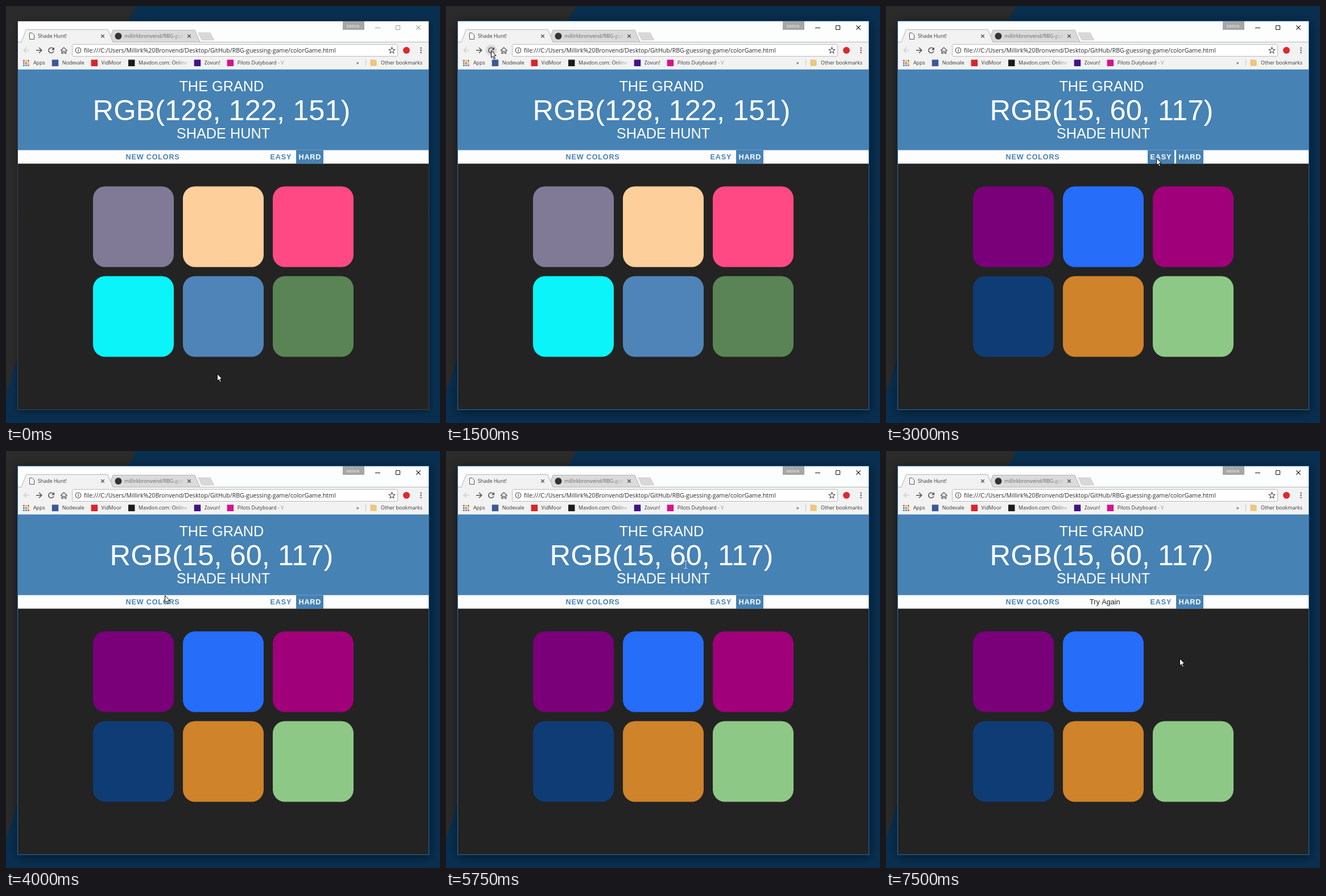
An HTML page with a canvas for the animation above (8 s loop, 763 by 734 pixels).

```html
<!DOCTYPE html>
<html lang="en">
<head>
<meta charset="utf-8">
<title>Shade Hunt</title>
<style>
html, body { margin: 0; width: 100%; height: 100%; overflow: hidden; background: #092f50; }
canvas { display: block; }
</style>
</head>
<body>
<canvas id="stage" width="763" height="734"></canvas>
<script>
const ctx = document.getElementById('stage').getContext('2d');
const LOOP = 8000, STEP = 250;
const UI = '"Open Sans", "Noto Sans", sans-serif';
const PAGE = '"Liberation Sans", Arial, sans-serif';
const EM = 12.65;
const STEEL = '#4682b4', DARK = '#232323', CHROME = '#f2f2f2';
const INK = '#333', ICON = '#505050', EDGE = '#b4b4b4';

const FIRST = ['#807a97', '#fdcf9b', '#ff4985', '#0af4fa', '#4f84b8', '#5a8456'];
const SECOND = ['#7a007a', '#266dfa', '#a0007a', '#0f3c75', '#cf832a', '#8ec886'];

const clamp = u => Math.max(0, Math.min(1, u));
const smooth = u => u * u * (3 - 2 * u);
const during = (t, from, to) => t >= from && t < to;

function rect(x, y, w, h, fill) {
  ctx.fillStyle = fill;
  ctx.fillRect(x, y, w, h);
}

function paint(path, fill, stroke, width = 1) {
  if (fill) { ctx.fillStyle = fill; ctx.fill(path); }
  if (stroke) { ctx.strokeStyle = stroke; ctx.lineWidth = width; ctx.stroke(path); }
}

const shape = (d, fill, stroke, width) => paint(new Path2D(d), fill, stroke, width);
const line = (d, color, width) => shape(d, null, color, width);

function circle(x, y, r, fill, stroke, width) {
  const path = new Path2D();
  path.arc(x, y, r, 0, Math.PI * 2);
  paint(path, fill, stroke, width);
}

function roundBox(x, y, w, h, r, fill, stroke) {
  const path = new Path2D();
  path.roundRect(x, y, w, h, r);
  paint(path, fill, stroke);
}

function text(str, x, y, font, color, align = 'left', spacing = 0) {
  ctx.font = font;
  ctx.textAlign = align;
  ctx.letterSpacing = spacing + 'px';
  ctx.fillStyle = color;
  ctx.fillText(str, x, y);
  const width = ctx.measureText(str).width;
  ctx.letterSpacing = '0px';
  return width;
}

// Small interface text that fades out before the given width
function label(str, x, y, room = 200, color = INK) {
  const fade = ctx.createLinearGradient(x + room - 24, 0, x + room, 0);
  fade.addColorStop(0, color);
  fade.addColorStop(1, color + '0');
  return Math.min(room, text(str, x, y, '8.9px ' + UI, fade));
}

function cross(x, y, r, color, width) {
  line(`M${x - r} ${y - r}l${2 * r} ${2 * r}m0 ${-2 * r}l${-2 * r} ${2 * r}`, color, width);
}

function desktop(focused) {
  rect(0, 0, 763, 734, '#092f50');
  shape('M0 0H229L217 22L21 618L0 684Z', '#2b2b2b');
  ctx.save();
  ctx.shadowColor = focused ? 'rgba(0,0,0,.55)' : 'rgba(0,0,0,.4)';
  ctx.shadowBlur = focused ? 18 : 12;
  ctx.shadowOffsetY = 3;
  rect(21, 26, 723, 685, DARK);
  ctx.restore();
}

function tabs() {
  rect(21, 27, 722, 37, '#fcfdfd');
  shape('M180 63.5L188 42.5H332L341 63.5Z', '#dadada', EDGE);
  shape('M338 47H359L366 60H344Z', '#d8d8d8', '#c6c6c6', .7);
  rect(21, 63, 722, 49, CHROME);
  line('M21 63.5H743', EDGE);
  shape('M27 64L35.5 41.5H179L188 64Z', CHROME);
  line('M27 63.5L35.5 41.5H179L188 63.5', EDGE);
  shape('M41.5 47.5H46L49.5 51V58.5H41.5Z', '#fff', ICON);
  label('Shade Hunt!', 56, 56);
  circle(197.5, 53, 6, INK);
  label('millirkbronvend/RBG-gue', 208, 56, 106, '#666');
  for (const x of [170, 322]) cross(x, 53, 2.8, ICON, 1.3);
}

function windowButtons(focused) {
  const color = focused ? '#111' : '#999';
  rect(592, 27, 38, 15, '#a6a6a6');
  text('Millirk', 599, 37.5, '8px ' + UI, '#f4f4f4');
  line('M649 38.5h9', color);
  line('M685.5 34.5h7v7h-7z', color);
  cross(725, 38, 3.7, color, 1.1);
}

function arrowIcon(x, dir, color) {
  line(`M${x - 5 * dir} 78h${9.5 * dir}M${x} 73.3l${4.8 * dir} 4.7l${-4.8 * dir} 4.7`, color, 1.5);
}

function star(x, y, r) {
  const path = new Path2D();
  for (let i = 0; i < 10; i++) {
    const a = i * Math.PI / 5 - Math.PI / 2, d = i % 2 ? r * .45 : r;
    path.lineTo(x + d * Math.cos(a), y + d * Math.sin(a));
  }
  path.closePath();
  paint(path, null, ICON, 1.1);
}

function toolbar(t) {
  arrowIcon(36, -1, '#cfcfcf');
  arrowIcon(58, 1, ICON);
  if (during(t, 1250, 2000)) circle(79.5, 78, t < 1750 ? 10 : 14, '#dadada');
  const reload = new Path2D();
  reload.arc(79.5, 78, 4.6, .3, Math.PI * 1.75);
  paint(reload, null, ICON, 1.5);
  shape('M85 72.5v5h-5z', ICON);
  line('M96 78.5L101.7 73L107.5 78.5M98 77.5v5.8h2.3v-3.8h3v3.8h2.3v-5.8', ICON, 1.2);

  roundBox(116.5, 67.5, 572, 21, 2, '#fff', '#b9b9b9');
  circle(127, 78, 4.8, null, ICON, 1.1);
  line('M127 75v1.3m0 1v3.5', ICON, 1.3);
  text('file:///C:/Users/Millirk%20Bronvend/Desktop/GitHub/RBG-guessing-game/colorGame.html',
    137, 82, '10.57px ' + UI, '#2b2b2b');
  star(678.5, 78.3, 5.6);
  circle(704, 78, 6, '#dc2a2e');
  for (let i = -1; i < 2; i++) circle(729.5, 78 + i * 4, 1.2, ICON);
}

function bookmarks() {
  const y = 103.3;
  const hues = ['#e0493d', '#f0b429', '#3c9e5a', '#4285f4'];
  for (let i = 0; i < 9; i++) {
    rect(30 + i % 3 * 4, 95 + Math.floor(i / 3) * 4, 2.7, 2.7, hues[i % 4]);
  }
  let x = 48 + label('Apps', 48, y) + 12;
  const sites = {
    'Nodevale': '#3b5998', 'VidMoor': '#d9252a', 'Mavdon.com: Online': '#1c1c1c',
    'Zovun!': '#43128a', 'Pilots Dutyboard - V': '#d6138b'
  };
  for (const [name, color] of Object.entries(sites)) {
    rect(x, 94.5, 11.5, 11.5, color);
    x += 18;
    x += label(name, x, y, 90) + 12;
  }
  label('»', 616, y, 200, '#222');
  rect(632, 94, 1, 12, '#c8c8c8');
  shape('M641 95h7l1 1h2v9h-10z', '#efc878', '#dcb25c', .7);
  label('Other bookmarks', 659, y);
}

function button(str, x, w, lit) {
  if (lit) rect(x, 253.7, w, 24, STEEL);
  text(str, x + 4.5, 269.7, `bold ${EM}px ${PAGE}`, lit ? '#fff' : STEEL, 'left', .8);
}

function heading(str, x, y, scale) {
  text(str, x, y, `${EM * scale}px ${PAGE}`, '#fff', 'center');
}

function page(t) {
  const reloaded = t >= 1750;
  rect(21, 111.7, 722, 143, STEEL);
  heading('THE GRAND', 378.9, 150, 2);
  heading(reloaded ? 'RGB(15, 60, 117)' : 'RGB(128, 122, 151)', 379, 200.8, 4);
  heading('SHADE HUNT', 382, 232.5, 2);

  rect(21, 253.7, 722, 24, '#fdfdfe');
  button('NEW COLORS', 206, 103, during(t, 4250, 5000));
  button('EASY', 460, 47, during(t, 3000, 3750));
  button('HARD', 510, 48, true);
  if (t >= 7000) text('Try Again', 358, 269.7, `${EM}px ${PAGE}`, '#222');

  rect(21, 277.7, 722, 433.3, DARK);
  (reloaded ? SECOND : FIRST).forEach((color, i) => {
    ctx.globalAlpha = i === 2 ? 1 - clamp((t - 6940) / 410) : 1;
    roundBox(153 + i % 3 * 158, 317.5 + Math.floor(i / 3) * 158, 142, 142, 21.3, color);
  });
  ctx.globalAlpha = 1;
}

function pointer(t) {
  let x = 371, y = 647;
  const glide = (start, end, toX, toY) => {
    const u = smooth(clamp((t - start) / (end - start)));
    x += (toX - x) * u;
    y += (toY - y) * u;
  };
  glide(0, 1250, 79, 78);
  glide(1750, 2500, 404, 274);
  glide(2500, 3250, 500, 265);
  glide(3500, 4000, 279, 254);
  glide(4750, 5750, 421, 200);
  glide(5750, 6750, 516, 365);

  ctx.save();
  ctx.translate(Math.round(x), Math.round(y));
  if (during(t, 5250, 6250)) line('M.5 -6V6M-2.5 -6.5h6m-6 13h6', '#c4d0da');
  else shape('M.5 .5V13L3.3 10.5L5.3 15.3L7.4 14.4L5.4 9.7L9 9.4Z', '#fff', '#000');
  ctx.restore();
}

function draw(t) {
  const focused = t >= 1500;
  desktop(focused);
  tabs();
  windowButtons(focused);
  toolbar(t);
  bookmarks();
  page(t);
  line('M20.5 26.5h723v684h-723z', focused ? '#2a6da6' : '#3b4650');
  pointer(t);
}

function tick() {
  const now = performance.now() % LOOP;
  draw(Math.floor(now / STEP) * STEP);
  requestAnimationFrame(tick);
}
tick();
</script>
</body>
</html>
```
